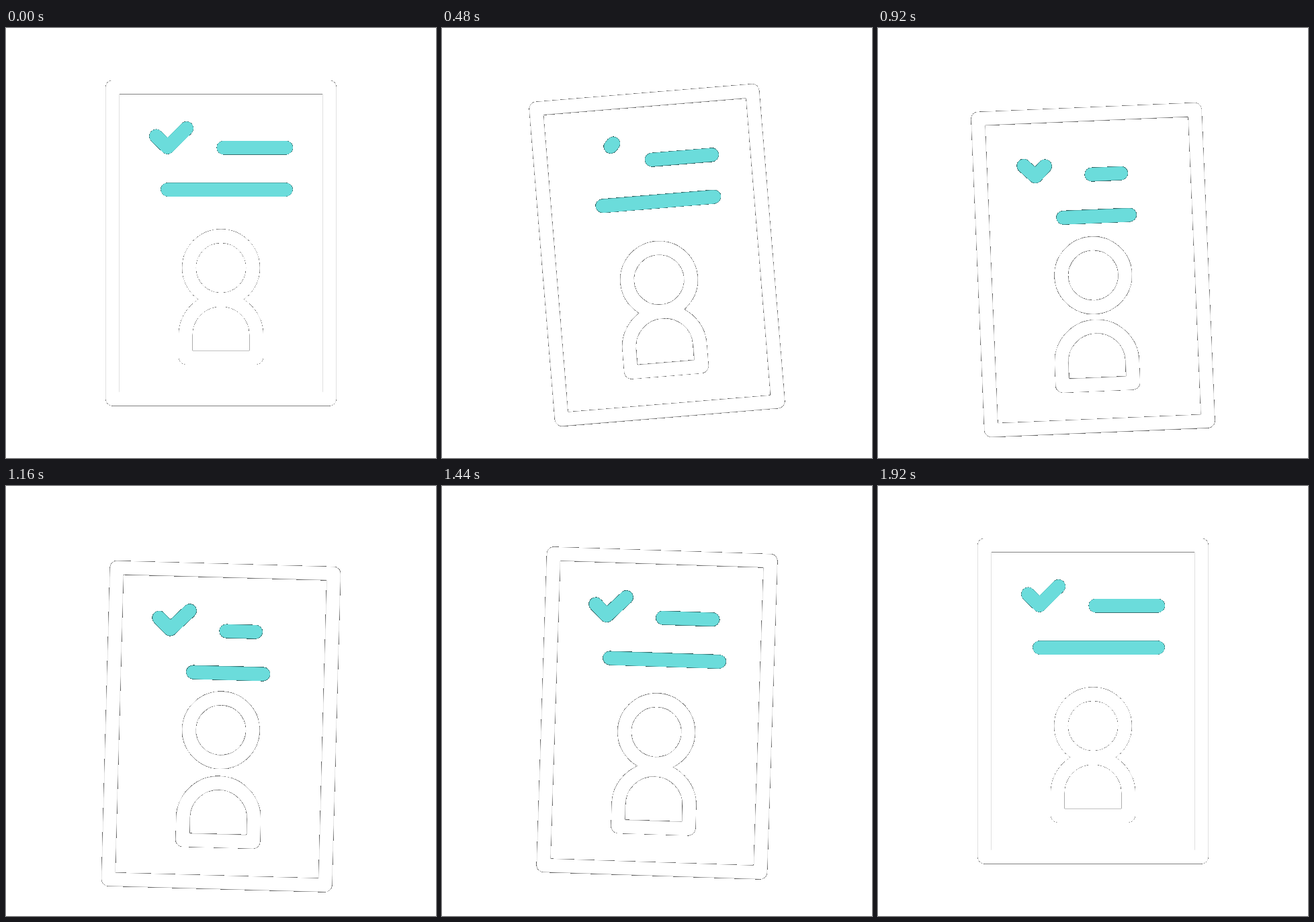
Animation of 640 by 640 pixels, one loop 1.96 s. Source, as an HTML page:

```html
<!DOCTYPE html>
<html lang="en">
<head>
<meta charset="utf-8">
<title>Resume card</title>
<style>
  html, body { margin: 0; width: 100%; height: 100%; overflow: hidden; background: #fff; }
  svg { display: block; width: 100%; height: 100%; }

  .card {
    fill: none;
    stroke: #fff;
    stroke-width: 20.75;
    stroke-linecap: round;
    stroke-linejoin: round;
    filter: url(#hard-edge);
  }
  .teal { stroke: #6bdcdb; }

  /* Paused: the script sets --t, so motion advances in 40 ms steps. */
  .float, .tilt, .head, .short, .long, .tick {
    animation: 1960ms cubic-bezier(.6, 0, .4, 1) calc(var(--t, 0) * -1ms) infinite paused;
  }
  .float { animation-name: float; }
  .tilt { animation-name: tilt; transform-origin: 320px 320px; }
  .head { animation-name: head; }
  .short { animation-name: short; }
  .long { animation-name: long; }
  .tick { animation-name: tick, blink; }

  @keyframes float {
    0%, 2.041%, 95.918%, 100% { transform: translateY(0); }
    48.98% { transform: translateY(40px); }
  }
  @keyframes tilt {
    0%, 2.041%, 95.918%, 100% { transform: rotate(0deg); }
    30.612% { transform: rotate(-5deg); }
    67.347% { transform: rotate(2deg); }
  }
  @keyframes head {
    0%, 24.49%, 85.714%, 100% { transform: translateY(0); }
    55.102% { transform: translateY(-32px); }
  }
  @keyframes short {
    0%, 16.327%, 89.796%, 100% { stroke-dasharray: 93 400; }
    53.061% { stroke-dasharray: 42.4 400; }
  }
  @keyframes long {
    0%, 14.286%, 84.694%, 100% { stroke-dasharray: 176 400; stroke-dashoffset: 0; }
    48.98%, 51.02% { stroke-dasharray: 98.8 400; stroke-dashoffset: -38.6; }
  }
  /* Wiped from its start, then drawn again from its start. */
  @keyframes tick {
    0%, 8.163% { stroke-dasharray: 64 400; stroke-dashoffset: 0; }
    30.61% { stroke-dasharray: 0 400; stroke-dashoffset: -64; }
    30.62%, 32.653% { stroke-dasharray: 0 400; stroke-dashoffset: 0; }
    57.143%, 100% { stroke-dasharray: 64 400; stroke-dashoffset: 0; }
  }
  @keyframes blink {
    0%, 33.673%, 100% { opacity: 1; animation-timing-function: step-end; }
    30.6% { opacity: 0; animation-timing-function: step-end; }
  }
</style>
</head>
<body>
<svg viewBox="0 0 640 640">
  <!-- Cuts faint edge pixels and darkens the other partly covered ones. -->
  <filter id="hard-edge" filterUnits="userSpaceOnUse" x="0" y="0" width="640" height="640"
          color-interpolation-filters="sRGB">
    <feComponentTransfer in="SourceAlpha" result="mask">
      <feFuncA type="discrete" tableValues="0 1 1"/>
    </feComponentTransfer>
    <feComposite in="SourceGraphic" in2="mask" operator="atop"/>
  </filter>

  <g class="card">
    <g class="float">
      <g class="tilt">
        <rect x="158.5" y="88" width="323" height="464"/>
        <circle class="head" cx="320" cy="357" r="47.5"/>
        <path d="M267.3 490.5V457a52.7 52.7 0 0 1 105.4 0v33.5z"/>
        <g class="teal">
          <path class="tick" d="M223.5 161L240.5 177.5L268.8 149.3"/>
          <path class="short" d="M323.8 178h93"/>
          <path class="long" d="M240.5 240.5h176"/>
        </g>
      </g>
    </g>
  </g>
</svg>
<script>
  const LOOP = 1960, STEP = 40;
  const root = document.documentElement;
  const start = performance.now();

  function update() {
    const t = (performance.now() - start) % LOOP;
    root.style.setProperty('--t', Math.floor(t / STEP) * STEP);
    requestAnimationFrame(update);
  }
  update();
</script>
</body>
</html>
```
